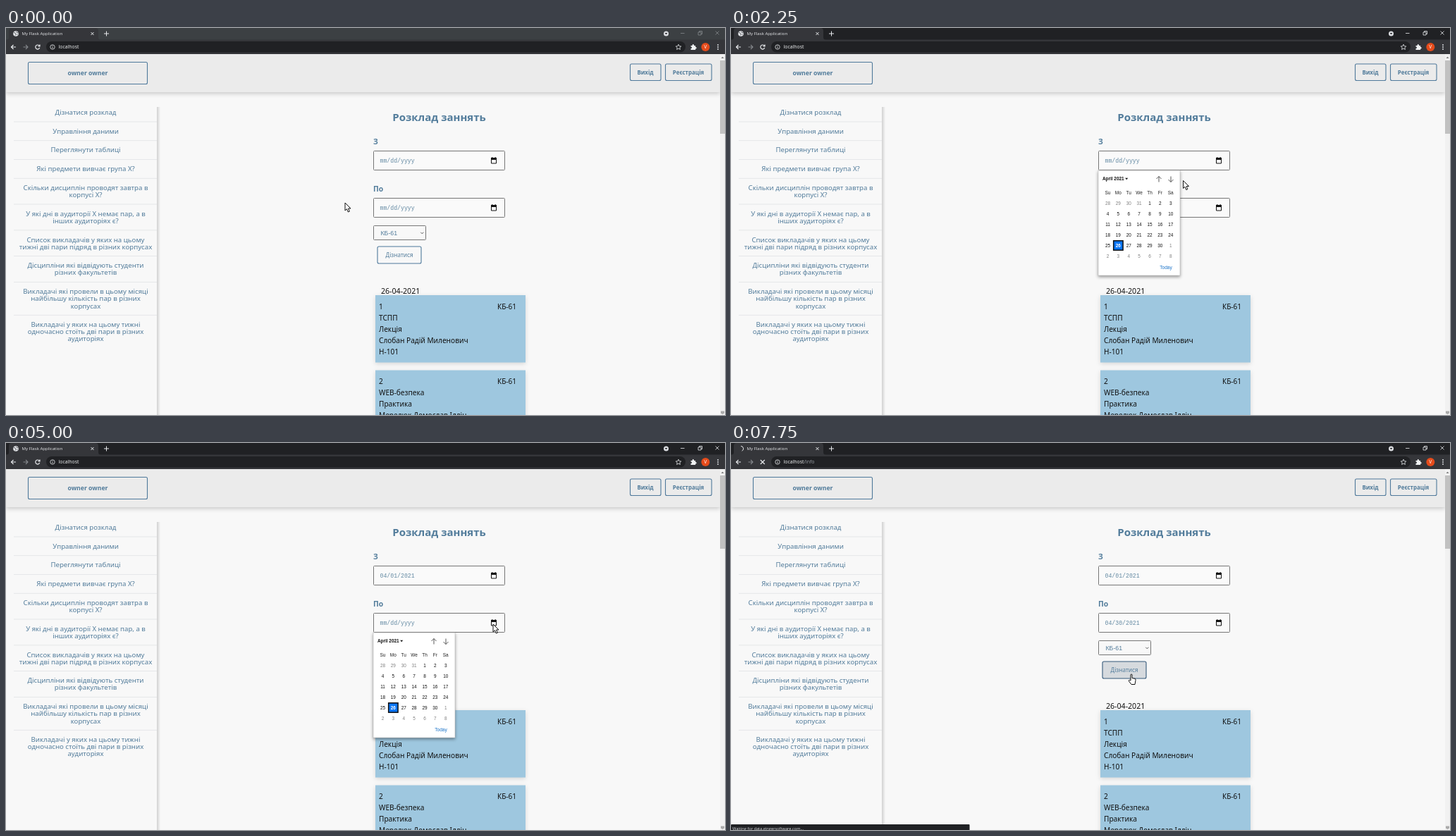
Recreate the animation shown at these times as an HTML page. Size 1020 px wide and 549 px high, loop 8 s.

```html
<!DOCTYPE html>
<html lang="uk">
<head>
<meta charset="utf-8">
<title>Schedule</title>
<style>
html, body { margin: 0; width: 100%; height: 100%; overflow: hidden; background: #f8f8f8; }
svg { display: block; font-family: "Noto Sans", "Open Sans", sans-serif; }
.ui { font-family: "Open Sans", "Noto Sans", sans-serif; }
.sans { font-family: "Liberation Sans", Arial, sans-serif; }
.mono { font-family: "Liberation Mono", monospace; }
.line { fill: none; stroke: #e8eaed; }
.box { fill: none; stroke: #4f799b; stroke-width: 1.1; }
.card { fill: #9ec7df; filter: drop-shadow(0 2px 3px #0002); }
</style>
</head>
<body>
<svg id="stage" width="1020" height="549" viewBox="0 0 1020 549"></svg>
<script>
const STEP = 250, LOOP = 8000, BLUE = '#527c9b';
const stage = document.getElementById('stage');

const text = (x, y, s, size, fill = BLUE, attrs = '') =>
  `<text x="${x}" y="${y}" font-size="${size}" fill="${fill}" ${attrs}>${s}</text>`;
const rect = (x, y, w, h, attrs) => `<rect x="${x}" y="${y}" width="${w}" height="${h}" ${attrs}/>`;
const path = (d, attrs) => `<path d="${d}" ${attrs}/>`;
const MID = 'text-anchor="middle" ', SEMI = 'font-weight="600"';

// Sidebar: first baseline of each entry, then its lines
const menu = [
  [123, 'Дізнатися розклад'],
  [149.7, 'Управління даними'],
  [176.4, 'Переглянути таблиці'],
  [203.3, 'Які предмети вивчає група X?'],
  [230, 'Скільки дисциплін проводят завтра в', 'корпусі X?'],
  [266.7, 'У які дні в аудиторії X немає пар, а в', 'інших аудиторіях є?'],
  [303.5, 'Список викладачів у яких на цьому', 'тижні дві пари підряд в різних корпусах'],
  [340.2, 'Дісципліни які відвідують студенти', 'різних факультетів'],
  [377.2, 'Викладачі які провели в цьому місяці', 'найбільшу кількість пар в різних', 'корпусах'],
  [424, 'Викладачі у яких на цьому тижні', 'одночасно стоїть дві пари в різних', 'аудиторіях'],
];

function sidebar() {
  return rect(214, 112, 5, 437, 'fill="url(#edge)"') + menu.map(([y, ...lines], i) =>
    (i ? rect(11, y - 17.2, 203, 1, 'fill="#e5e7e9"') : '') +
    lines.map((s, j) => text(113, y + j * 10.2, s, 9.65, BLUE, MID)).join('')).join('');
}

function card(y, lines) {
  return rect(524, y, 213, 95.5, 'class="card"') + text(697, y + 19.7, 'КБ-61', 10, '#111') +
    lines.map((s, i) => text(529, y + 19.7 + 16 * i, s, 10.1, '#111')).join('');
}

function browser() {
  return path('M0 17Q4 17 4 13V4Q4 0 8 0H127Q131 0 131 4V13Q131 17 135 17Z', 'fill="#35363a"') +
    rect(0, 16.5, 1020, 20.5, 'fill="#35363a"') +
    rect(57, 19, 907, 15.5, 'rx="7.7" fill="#202124"') +
    text(22.5, 10.3, 'My Flask Application', 6.1, '#e8eaed', 'class="ui"') +
    path('M120.5 6l4 4m0-4l-4 4M139 8h7m-3.5-3.5v7', 'class="line"') +
    '<circle cx="936.5" cy="8" r="3.5" fill="#dadce0"/>' + path('M934.7 7h3.6l-1.8 2.3Z', 'fill="#202124"') +
    path('M14 27H7.5M10.5 24l-3 3 3 3', 'class="line" stroke-width="1.2"') +
    path('M24.5 27H31M28 24l3 3-3 3', 'class="line" stroke-width="1.1" style="stroke:#85888c"') +
    '<circle cx="66" cy="27" r="3.2" class="line" stroke-width=".8"/>' +
    path('M66 26.6v2.2M66 24.8v.9', 'class="line" stroke-width=".9"') +
    path('M954 23.2l1.1 2.5 2.7.3-2 1.8.6 2.7-2.4-1.4-2.4 1.4.6-2.7-2-1.8 2.7-.3Z', 'class="line" stroke-width=".8"') +
    path('M971.5 25h2q0-2 1.3-2t1.3 2h2v2q1.6 0 1.6 1.3t-1.6 1.3v1.4h-6.6v-2q1.5 0 1.5-1.2t-1.5-1.2Z', 'fill="#f1f3f4"') +
    '<circle cx="992.3" cy="27" r="6" fill="#e54b1b"/>' + text(992.3, 29.4, 'V', 6.6, '#fff', MID) +
    [24, 27, 30].map(y => `<circle cx="1010" cy="${y}" r=".9" fill="#e8eaed"/>`).join('');
}

function page() {
  return rect(0, 37, 1013, 54, 'fill="#ebebeb" style="filter:drop-shadow(0 2px 3px #0003)"') +
    rect(31.5, 48.5, 169, 31, 'rx="2" class="box"') + text(116, 67, 'owner owner', 8.7, BLUE, MID + SEMI) +
    rect(885.5, 51, 43.5, 23.5, 'rx="2" class="box"') + text(907, 65.5, 'Вихід', 7.9, BLUE, MID + SEMI) +
    rect(935.5, 51, 65.5, 23.5, 'rx="2" class="box"') + text(968, 65.5, 'Реєстрація', 7.9, BLUE, MID + SEMI) +
    sidebar() +
    text(614.5, 131.7, 'Розклад заннять', 15, BLUE, MID + SEMI) +
    text(521, 164.7, 'З', 10.4, BLUE, SEMI) + text(521, 231.8, 'По', 10.4, BLUE, SEMI) +
    rect(521.5, 280.5, 74, 20, 'rx="1" fill="#f8f8f8" stroke="#767676"') +
    text(531.5, 294, 'КБ-61', 8.8, BLUE, 'class="sans"') +
    path('M588.3 289.8l2 2 2-2', 'fill="none" stroke="#555"') +
    text(532, 376.6, '26-04-2021', 10.6, '#111') +
    card(379, ['1', 'ТСПП', 'Лекція', 'Слобан Радій Миленович', 'Н-101']) +
    card(485.5, ['2', 'WEB-безпека', 'Практика', 'Мерелюк Домослав Ілліч']) +
    rect(1013, 37, 7, 512, 'fill="#f1f1f1"') + rect(1013, 46, 7, 104, 'fill="#c1c1c1"') +
    path('M1014.5 43l2-2.2 2 2.2Z', 'fill="#777"') + path('M1014 543.5h5v3l-2.5 1.5-2.5-1.5Z', 'fill="#aaa"');
}

function dateField(y, value, focus) {
  return rect(521.5, y + .5, 186, 27, `rx="1" fill="#fafafa" stroke="${focus ? '#111' : '#767676'}" stroke-width="${focus ? 1.8 : 1}"`) +
    text(530.5, y + 16.8, value || 'mm/dd/yyyy', 8.2, '#648aa3', 'class="mono"') +
    path(`M688.5 ${y + 11}h7v7h-7Z`, 'fill="none" stroke="#111"') +
    rect(688, y + 10, 8, 3, 'fill="#111"') +
    path(`M689.8 ${y + 9}v2m4.4-2v2`, 'stroke="#111"');
}

function calendar(y, [cx, cy], picked) {
  const PITCH = 14.87;
  let s = rect(521, y, 116, 149, 'fill="#fff" stroke="#bbb" stroke-width=".6" style="filter:drop-shadow(0 2px 2px #0006)"') +
    text(527, y + 14, 'April 2021', 6.4, '#111', 'font-weight="bold"') +
    path(`M559.2 ${y + 10.8}h4l-2 2.4Z`, 'fill="#111"') +
    path(`M607 ${y + 16.5}v-8m-3.5 3.5l3.5-3.5 3.5 3.5M624 ${y + 8.5}v8m-3.5-3.5l3.5 3.5 3.5-3.5`, 'fill="none" stroke="#444" stroke-width=".9"') +
    text(617, y + 140.3, 'Today', 6.5, '#1a73c8', MID);
  'Su Mo Tu We Th Fr Sa'.split(' ').forEach((d, i) => s += text(534.5 + i * PITCH, y + 33.7, d, 6.5, '#222', MID));
  for (let i = 0; i < 42; i++) {
    const d = i - 3, x = 534.5 + i % 7 * PITCH, my = y + 47 + Math.floor(i / 7) * PITCH;
    const chosen = d === (picked || 26), near = v => Math.abs(v) < PITCH / 2;
    if (chosen) s += rect(x - 6.7, my - 6.7, 13.4, 13.4, 'fill="#0a75f5" stroke="#101010" stroke-width="1.5"');
    else if (near(cx - x) && near(cy - my)) s += rect(x - 7.3, my - 7.3, 14.6, 14.6, 'fill="#b5d4f7"');
    else if (d === 26) s += rect(x - 6.7, my - 6.7, 13.4, 13.4, 'fill="none" stroke="#0a75f5" stroke-width=".8"');
    const inMonth = d > 0 && d < 31;
    s += text(x, my + 2.3, d < 1 ? 31 + d : d > 30 ? d - 30 : d, 6.4,
      chosen ? '#fff' : inMonth ? '#111' : '#808080', MID + (chosen ? 'font-weight="bold"' : ''));
  }
  return `<g class="sans">${s}</g>`;
}

// Pointer path: time, x, y
const stops = [
  [0, 481, 248], [1250, 693, 188], [2000, 693, 188], [2500, 590, 245], [3250, 585, 257],
  [3500, 592, 249], [3750, 592, 249], [4000, 625, 252], [4500, 691, 257], [5000, 691, 257],
  [6000, 609, 374], [6250, 609, 374], [6500, 614, 376], [7250, 567, 328], [LOOP, 567, 328],
];
function pointer(t) {
  const i = stops.findIndex(s => s[0] > t), [t0, x0, y0] = stops[i - 1], [t1, x1, y1] = stops[i];
  const k = (t - t0) / (t1 - t0);
  return [x0 + (x1 - x0) * k, y0 + (y1 - y0) * k];
}

const ARROW = 'M0 0V11L2.5 8.7 4.3 13 6.3 12.2 4.6 8H8Z';
const HAND = 'M0 9V1Q0 0 1 0T2 1V5.5L6 6.3Q7.4 6.8 7 8.5L6 14.5H1L-2.6 9.8Q-3 8 -1.5 8.3Z';

function live(t) {
  const during = (a, b) => t >= a && t < b;
  const pos = pointer(t), [x, y] = pos;
  const loading = t >= 7500, hover = x > 527 && x < 589 && y > 310 && y < 334 && t > 6500;
  const ctl = t < 1250 ? '#85888c' : '#e8eaed';
  let s = path('M957 7.5h5.5M982 6h4v4h-4ZM983.5 6v-1.5h4V8.5h-1.5M1006.5 4.5l5 5m0-5l-5 5',
    `fill="none" stroke="${ctl}" stroke-width=".8"`);

  s += loading
    ? path('M14 4.5a3.5 3.5 0 0 1 1.5 6.7', `class="line" transform="rotate(${(t - 7750) * .36} 14 8)"`) +
      path('M41.8 24l6 6m0-6l-6 6', 'class="line" stroke-width="1.2"')
    : '<circle cx="14" cy="8" r="3.8" fill="#e8eaed"/>' +
      path('M11 6.5l2 .5 1 1.5-1 2M14.5 5l1 1.5 2 .3M15 9.5l1.5-.5', 'fill="none" stroke="#45474b" stroke-width=".9"') +
      path('M47.4 25.4a3 3 0 1 0 .3 2.6M48 23.4v2.6h-2.6', 'class="line" stroke-width="1.2"');
  s += text(74.5, 29.4, 'localhost' + (t >= 7750 ? '<tspan fill="#9aa0a6">/info</tspan>' : ''), 6.9, '#f1f3f4', 'class="ui"');

  s += dateField(174, t >= 4000 && '04/01/2021', during(1500, 2000) || during(4000, 4750));
  s += dateField(241, t >= 6250 && '04/30/2021', during(4750, 5000) || during(6250, 7500));
  if (during(1750, 2000)) s += rect(639, 187, 49, 11, 'fill="#fff"');
  s += rect(527, 310, 62, 24, `rx="2" class="box" style="fill:${hover ? '#d6dade' : 'none'};${loading ? 'stroke:#35597a' : ''}"`) +
    text(558, 324.7, 'Дізнатися', 8.1, BLUE, MID);

  if (during(2000, 4000)) s += calendar(202, pos, t >= 3750 && 1);
  if (during(5000, 6500)) s += calendar(269, pos, t >= 6250 && 30);
  if (loading) s += rect(0, 541, 338.5, 9, 'rx="1" fill="#202124"') +
    text(2, 549.3, 'Waiting for data.gingersoftware.com...', 5.7, '#dadce0', 'class="ui"');
  return s + path(hover ? HAND : ARROW, `transform="translate(${x} ${y})" fill="#fff" stroke="#111" stroke-width="1" stroke-linejoin="round"`);
}

stage.innerHTML = '<defs><linearGradient id="edge"><stop stop-color="#d0d0d0"/><stop offset="1" stop-color="#f8f8f8"/></linearGradient></defs>' +
  '<rect id="strip" width="1020" height="17"/>' + browser() + page() + '<g id="live"></g>';
const strip = document.getElementById('strip'), layer = document.getElementById('live');

const start = performance.now();
let shown = -1;
function frame() {
  const t = Math.floor((performance.now() - start) % LOOP / STEP) * STEP;
  if (t !== shown) {
    shown = t;
    strip.setAttribute('fill', t < 1250 ? '#3c4043' : '#202124');
    layer.innerHTML = live(t);
  }
  requestAnimationFrame(frame);
}
frame();
</script>
</body>
</html>
```
